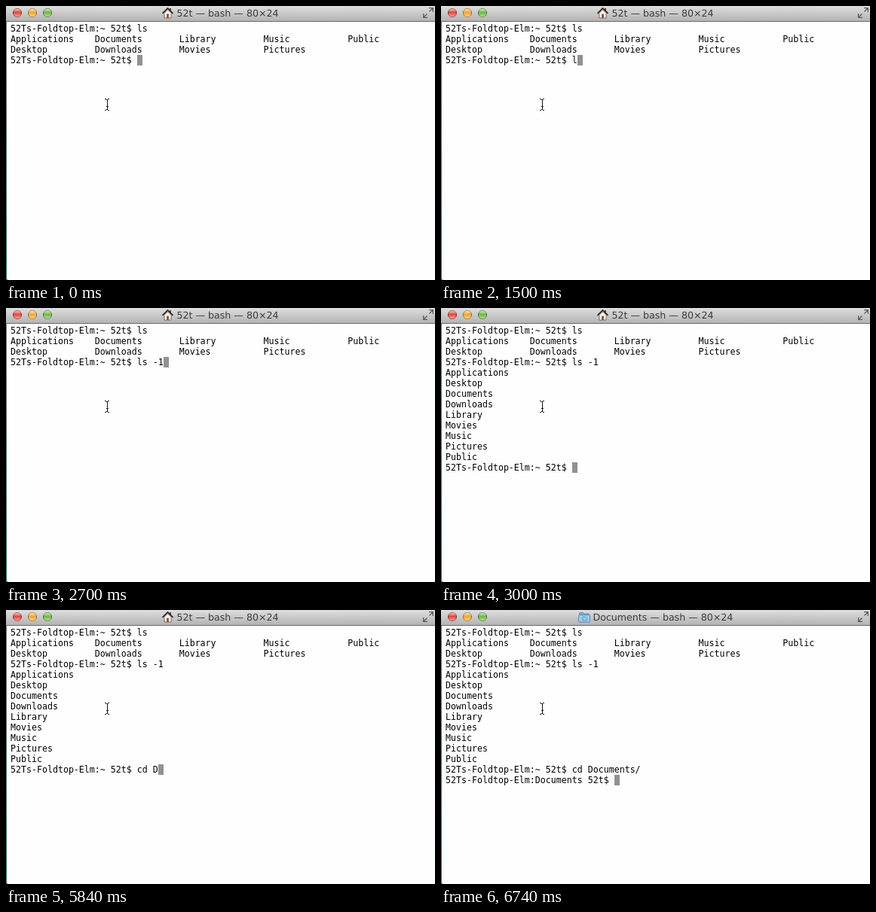
These frames come from a looping animation (569 by 364 pixels, 8 s). An HTML page:

```html
<!DOCTYPE html>
<html lang="en">
<head>
<meta charset="utf-8">
<title>Terminal</title>
<style>
  html, body { margin: 0; width: 100%; height: 100%; overflow: hidden; background: #fefefe; }
  #stage { position: absolute; left: 0; top: 0; width: 569px; height: 364px; overflow: hidden; background: #fefefe; }
  svg { position: absolute; left: 0; top: 0; }
  #title { font: 12.6px "DejaVu Sans", sans-serif; fill: #3b3b3b; text-rendering: geometricPrecision; }
  #screen {
    position: absolute; left: 6px; top: 23px; margin: 0;
    font: 11.627px/14px "DejaVu Sans Mono", monospace; color: #000;
  }
  #caret { position: absolute; width: 7px; height: 14px; background: #919191; }
</style>
</head>
<body>
<div id="stage">
  <svg width="569" height="364" viewBox="0 0 569 364">
    <defs>
      <linearGradient id="bar" x2="0" y2="1">
        <stop offset="0" stop-color="#dedede"/>
        <stop offset="1" stop-color="#b3b3b3"/>
      </linearGradient>
      <linearGradient id="edge" x2="0" y2="1">
        <stop offset="0" stop-color="#66747c"/>
        <stop offset="1" stop-color="#2f6870"/>
      </linearGradient>
      <linearGradient id="gloss" x2="0" y2="1">
        <stop offset="0" stop-color="#fff" stop-opacity=".75"/>
        <stop offset=".45" stop-color="#fff" stop-opacity="0"/>
        <stop offset="1" stop-color="#fff" stop-opacity=".5"/>
      </linearGradient>
    </defs>
    <rect width="569" height="20" fill="url(#bar)"/>
    <rect y="20" width="569" height="1" fill="#6b6b6b"/>
    <rect y="21" width="1" height="343" fill="url(#edge)"/>
    <path d="M0 361V364H3Q1 363.500 0 361Z" fill="#2f6870"/>
    <g id="lights"></g>

    <g id="home">
      <path d="M210 9.500L214.500 5L219 9.500V16H210Z" fill="#fafafa" stroke="#555" stroke-width=".8"/>
      <rect x="217" y="3" width="2" height="4" fill="#8a3a25"/>
      <path d="M207.500 9.800L214.500 3L221.500 9.800" fill="none" stroke="#2c2521" stroke-width="1.700"/>
      <rect x="213" y="10.500" width="3" height="5.500" fill="#a3532c"/>
    </g>
    <g id="folder" stroke="#5486ad" stroke-width=".9">
      <path d="M183.500 15V4.500Q183.500 3.500 184.500 3.500H188.500L190 5H196.500V15Z" fill="#7fb2d6"/>
      <rect x="182.500" y="6.500" width="15" height="9.500" rx="1" fill="#9dcbe8"/>
      <path d="M188 9H191.500L193 10.500V14H188Z" fill="none" stroke="#6898bb"/>
    </g>
    <text id="title" y="14"></text>

    <g stroke="#5b5b5b" stroke-width="1.300" fill="none">
      <path d="M561 2.700H566.300V8M566 3L561.500 7.500"/>
      <path d="M553.700 10V15.300H559M554 15L558.500 10.500"/>
    </g>
  </svg>

  <pre id="screen"></pre>
  <div id="caret"></div>

  <svg width="569" height="364" viewBox="0 0 569 364" fill="none" stroke="#111" shape-rendering="crispEdges">
    <path d="M131 123.500H133M135 123.500H137M133 124.500H135M134.500 124V138M133 137.500H135M131 138.500H133M135 138.500H137M133 133.500H136"/>
  </svg>
</div>

<script>
const LOOP = 8000, CELL = 7, ROW = 14, LEFT = 6, TOP = 23;
const $ = id => document.getElementById(id);

const host = "52Ts-Foldtop-Elm", user = "52t";
const prompt = dir => `${host}:${dir} ${user}$ `;
const home = prompt("~");
const names = ["Applications", "Desktop", "Documents", "Downloads", "Library",
               "Movies", "Music", "Pictures", "Public"];
const columns = row => names.filter((_, i) => i % 2 === row).map(n => n.padEnd(16)).join("");

const listed = [home + "ls", columns(0), columns(1)];
const single = [...listed, home + "ls -1", ...names];
const moved = [...single, home + "cd Documents/"];

// [start ms, lines above, prompt, typed text]
const steps = [
  [0, listed, home, ""],
  [900, listed, home, "l"],
  [1050, listed, home, "ls"],
  [1500, listed, home, "l"],
  [2100, listed, home, "ls"],
  [2250, listed, home, "ls "],
  [2700, listed, home, "ls -1"],
  [3000, single, home, ""],
  [5400, single, home, "c"],
  [5550, single, home, "cd "],
  [5840, single, home, "cd D"],
  [6140, single, home, "cd Doc"],
  [6290, single, home, "cd Documents/"],
  [6740, moved, prompt("Documents"), ""]
];

$("lights").innerHTML = [["#e2473f", "#8d2b27"], ["#f0a832", "#98651c"], ["#6fb845", "#44732a"]]
  .map(([fill, rim], i) => {
    const at = `cx="${15 + 20 * i}" cy="9" r="5.5"`;
    return `<circle ${at} fill="${fill}" stroke="${rim}"/><circle ${at} fill="url(#gloss)"/>`;
  }).join("");

let shown = null;
function show(step) {
  if (step === shown) return;
  shown = step;
  const [, above, lead, typed] = step;
  const line = lead + typed;
  const inFolder = above === moved;
  $("screen").textContent = [...above, line].join("\n");
  $("caret").style.left = LEFT + CELL * line.length + "px";
  $("caret").style.top = TOP + ROW * above.length + "px";
  $("home").style.display = inFolder ? "none" : "";
  $("folder").style.display = inFolder ? "" : "none";
  $("title").setAttribute("x", inFolder ? 201.5 : 226.5);
  $("title").textContent = (inFolder ? "Documents" : user) + " — bash — 80×24";
}

const start = performance.now();
function tick() {
  const t = (performance.now() - start) % LOOP;
  show(steps.findLast(s => s[0] <= t));
  requestAnimationFrame(tick);
}
tick();
</script>
</body>
</html>
```
